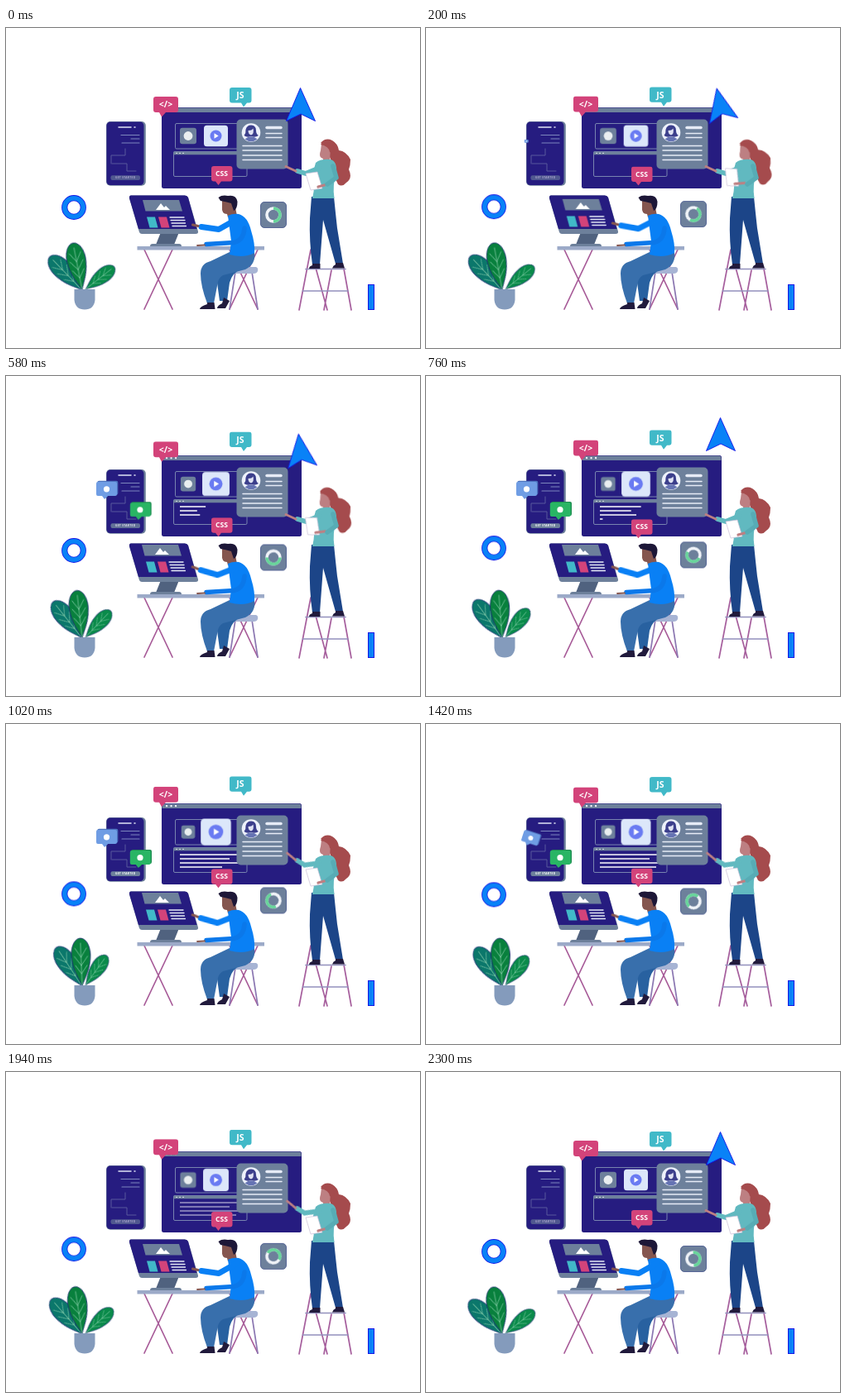
Recreate the animation shown at these times as an HTML page without scripts. Size 500x387 px, loop 2.32 s.

```html
<!DOCTYPE html>
<html lang="en">
<head>
<meta charset="utf-8">
<title>Design team at work</title>
<style>
html, body { margin: 0; width: 100%; height: 100%; overflow: hidden; background: #fff; }
svg { display: block; width: 100vw; height: 100vh; }
text { font-family: "Open Sans", "Noto Sans", sans-serif; font-weight: 700; fill: #fff; text-anchor: middle; }

.bob, .sway, .swell { animation: 1160ms cubic-bezier(.37,0,.63,1) infinite alternate; }
.bob { animation-name: bob; }
.sway { animation-name: sway; }
.swell { animation-name: swell; }
@keyframes bob { to { transform: translateY(var(--to)); } }
@keyframes sway { from { transform: rotate(var(--from)); } to { transform: rotate(var(--to)); } }
@keyframes swell { to { transform: scale(var(--to)); } }

.loop { animation: 2320ms ease-in-out infinite; }
.spin { animation-name: spin; animation-timing-function: linear; }
@keyframes spin { to { transform: rotate(360deg); } }

.arrow { animation-name: fly; }
@keyframes fly {
  0%, 100% { transform: none; opacity: 1; }
  16.4% { transform: translate(-1px, 0) rotate(-21deg); }
  28% { transform: translateY(-3px) rotate(-4deg); animation-timing-function: ease-in; }
  32.8% { transform: translateY(-22px); opacity: 1; animation-timing-function: linear; }
  39% { transform: translateY(-55px); opacity: .8; }
  40%, 86% { transform: translateY(-55px); opacity: 0; }
  87% { transform: none; opacity: 0; }
  95% { transform: none; opacity: 1; }
}

.nod { animation-name: nod; }
@keyframes nod { 0%, 32%, 100% { transform: none; } 16.4% { transform: var(--to); } }

.point { animation-name: point; transform-origin: 382px 168px; }
@keyframes point { 0%, 34%, 98%, 100% { transform: none; } 43%, 86% { transform: rotate(15deg); } }

.scroll { animation-name: scroll; }
.reach { animation-name: reach; transform-origin: 277px 232px; }
@keyframes scroll { 0%, 5%, 82%, 100% { transform: none; } 15%, 68% { transform: translate(-1px, -4px); } }
@keyframes reach { 0%, 5%, 82%, 100% { transform: none; } 15%, 68% { transform: rotate(8deg); } }

.pop { animation-name: pop; }
.pop.late { animation-name: pop-late; }
@keyframes pop {
  0%, 6% { transform: scale(0); }
  15%, 58% { transform: none; }
  61.2% { transform: translate(5px, 1px) rotate(18deg) scale(.82); }
  67%, 100% { transform: translate(14px, 3px) rotate(50deg) scale(0); }
}
@keyframes pop-late {
  0%, 13% { transform: scale(0); }
  16.4% { transform: scale(.25); }
  26%, 66% { transform: none; }
  74%, 100% { transform: scale(0); }
}

.glow { animation-name: glow; }
@keyframes glow { 0%, 18%, 82%, 100% { opacity: .6; } 30%, 64% { opacity: 1; } }

.code { animation-name: fade; }
@keyframes fade { 0%, 58% { opacity: 1; } 83.6% { opacity: .55; } 97%, 100% { opacity: 0; } }
.code path { stroke-dasharray: 1 1; animation: type 2320ms linear infinite; }
.code path:nth-child(n+2) { animation-name: type-next; }
.code path:nth-child(4) { animation-name: type-last; }
@keyframes type { 0%, 12% { stroke-dashoffset: 1; } 43%, 100% { stroke-dashoffset: 0; } }
@keyframes type-next { 0%, 15.5% { stroke-dashoffset: 1; } 43%, 100% { stroke-dashoffset: 0; } }
@keyframes type-last { 0%, 32% { stroke-dashoffset: 1; } 48%, 100% { stroke-dashoffset: 0; } }

.line { fill: none; stroke-linecap: round; stroke-linejoin: round; }
.navy { fill: #261c80; }
.slate { fill: #6d809b; }
.pale { stroke: #e6ebf6; }
.pink { fill: #d3437a; }
.teal { fill: #41b9c8; }
.skin { stroke: #bd7f82; }
.shirt { stroke: #0980f5; }
.top { stroke: #61b9c0; }
</style>
</head>
<body>
<svg viewBox="0 0 500 387">
<defs>
  <g id="leaf">
    <path d="M0 0C-3-9-11-19-11.500-38C-11.500-50-6-58 0-58C6-58 11.500-50 11.500-38C11-19 3-9 0 0Z" stroke="#1b2772" stroke-width=".8"/>
    <path class="line" d="M0 0V-52M0-15L-7-25M0-15L7-25M0-25L-8-36M0-25L8-36M0-35L-7-46M0-35L7-46" stroke="#8fd3b0" stroke-width=".7"/>
  </g>
  <path id="note" d="M2 0H23Q25 0 25 2V15Q25 17 23 17H14L10 21L7 17H2Q0 17 0 15V2Q0 0 2 0Z"/>
</defs>
<rect width="500" height="387" fill="#fff"/>

<!-- plant -->
<g transform="translate(92 317)" fill="#0b776b">
  <g class="sway" style="--from:-44deg;--to:-33deg"><use href="#leaf" transform="scale(.97)"/></g>
</g>
<g transform="translate(96 316)" fill="#0a8a4a">
  <g class="sway" style="--from:52deg;--to:35deg"><use href="#leaf" transform="scale(.76)"/></g>
</g>
<g transform="translate(92 317)" fill="#08803d">
  <g class="sway" style="--from:-11deg;--to:-2deg"><use href="#leaf"/></g>
</g>
<path d="M82.500 316H107.500V329Q106 340.500 95 340.500Q84 340.500 82.500 329Z" fill="#849bbc"/>

<!-- loose shapes -->
<g class="bob" style="--to:-12px" fill="none">
  <circle cx="82" cy="217" r="11.300" stroke="#1414e6" stroke-width="7.200"/>
  <circle cx="82" cy="217" r="11.300" stroke="#0982f7" stroke-width="5.600"/>
</g>
<rect x="437.500" y="310.500" width="7" height="30" fill="#0982f7" stroke="#1414e6"/>

<!-- phone -->
<rect x="121" y="113" width="47.800" height="77.800" rx="5" class="slate"/>
<rect x="121.500" y="113.500" width="45" height="76.500" rx="4.500" class="navy"/>
<g class="line">
  <path d="M136 120H151M155 120H156" stroke="#dfe4f5" stroke-width="1.500"/>
  <path d="M139 129.500H161M151 134H161M140 139H161" stroke="#7d86bd" stroke-width="1.200"/>
  <path d="M127 164V154H144V146M128 164H146V173H157" stroke="#59599c"/>
</g>
<g class="loop glow">
  <rect x="126.500" y="178.300" width="35.500" height="5.800" rx="2" class="slate"/>
  <text x="144.200" y="182.400" font-size="3.300" letter-spacing=".3">GET STARTED</text>
</g>
<g class="loop pop" style="transform-origin:121px 137px">
  <use href="#note" x="110.300" y="126.800" fill="#4d74bf"/>
  <use href="#note" x="109" y="128" fill="#6f9de4"/>
  <circle cx="121.500" cy="136.800" r="3.600" fill="#fff"/>
</g>
<g class="loop pop late" style="transform-origin:157px 170px">
  <use href="#note" x="151" y="152" fill="#1e8b50"/>
  <use href="#note" x="149.800" y="153" fill="#29b564"/>
  <circle cx="162" cy="161.700" r="3.600" fill="#fff"/>
</g>

<!-- wide screen -->
<rect x="188" y="96" width="169" height="98" rx="2.500" class="navy"/>
<path d="M188.500 102V99Q188.500 96.500 191 96.500H354Q356.500 96.500 356.500 99V102Z" class="slate"/>
<path class="line" d="M194 99.200h.1M199.500 99.200h.1M205 99.200h.1" stroke="#fff" stroke-width="2.200"/>
<g fill="none" stroke="#8290b5" stroke-width=".9">
  <rect x="204.500" y="115.500" width="77" height="30.500" rx="1.500"/>
  <rect x="202.500" y="149.500" width="88.500" height="30" rx="1.500"/>
</g>
<path d="M202.500 149.500H291V153.300H202.500Z" class="slate"/>
<path class="line" d="M206 151.400h.1M210 151.400h.1M214 151.400h.1" stroke="#fff" stroke-width="1.300"/>
<g class="loop code" fill="none" stroke="#fff" stroke-width="1.500">
  <path pathLength="1" d="M210 158H284"/>
  <path pathLength="1" d="M210 163H270"/>
  <path pathLength="1" d="M210 168H280"/>
  <path pathLength="1" d="M210 173H278"/>
</g>
<g class="swell" style="--to:.82;transform-origin:220px 130.500px">
  <rect x="210" y="120.800" width="20" height="19.500" rx="3" class="slate"/>
  <circle cx="220" cy="130.500" r="5.400" fill="#e9eef0"/>
</g>
<g class="swell" style="--to:1.27;transform-origin:253.500px 130.500px">
  <rect x="239" y="117.800" width="29" height="25.500" rx="3.500" fill="#dce7fa"/>
  <circle cx="253.500" cy="130.500" r="7" fill="#6a7bf2"/>
  <path d="M251.500 127.300L256.700 130.500L251.500 133.700Z" fill="#fff"/>
</g>

<!-- profile card -->
<rect x="278.500" y="110.500" width="62" height="60" rx="5" class="slate"/>
<circle cx="296" cy="126.500" r="11.300" fill="#edf1fb"/>
<path d="M287.500 130Q290 127 289.500 123Q291 117 296.500 117.500Q302 118 302 124Q302 128 305 130Q301 133 296 131Q291 133 287.500 130Z" fill="#3c3f8c"/>
<path d="M292.500 124Q297 124 298.500 121.500Q300 128 296 129.500Q292.500 128.500 292.500 124Z" fill="#dfe2f3"/>
<path d="M288.500 134.500Q296 128 303.500 134.500Q296 140 288.500 134.500Z" fill="#6573b3"/>
<g class="line pale">
  <path d="M315 120.500H332" stroke-width="3.500"/>
  <path d="M314 127.500H333M314 132.500H333M286 142.500H333M286 148H333M286 154H333M286 159.500H333" stroke-width="1.500"/>
</g>

<!-- speech bubbles -->
<g class="bob" style="--to:-7.500px">
  <path class="pink" d="M181 83H205Q208 83 208 86V99Q208 102 205 102H193L188 107.500L185 102H181Q178 102 178 99V86Q178 83 181 83Z"/>
  <text x="193" y="96.300" font-size="10.500">&lt;/&gt;</text>
</g>
<g class="bob" style="--to:-9px">
  <path class="teal" d="M273 72H293.500Q296.500 72 296.500 75V87.500Q296.500 90.500 293.500 90.500H291L287 95.500L284 90.500H273Q270 90.500 270 87.500V75Q270 72 273 72Z"/>
  <text x="282.800" y="85.200" font-size="10.500">JS</text>
</g>
<g class="bob" style="--to:8.500px">
  <path class="pink" d="M251 167H270.500Q273.500 167 273.500 170V182.500Q273.500 185.500 270.500 185.500H260L256.500 190L253 185.500H251Q248 185.500 248 182.500V170Q248 167 251 167Z"/>
  <text x="260.500" y="179.200" font-size="8.600">CSS</text>
</g>

<!-- chart tile -->
<g class="bob" style="--to:-13px">
  <rect x="307.500" y="210.500" width="31" height="31" rx="4.500" class="slate" stroke="#40518a" stroke-width=".8"/>
  <g class="loop spin" style="transform-origin:323px 226px" fill="none" stroke-width="3.600">
    <circle cx="323" cy="226" r="8" stroke="#f0f3f8"/>
    <path d="M323 218A8 8 0 0 1 323 234" stroke="#67d59a"/>
  </g>
</g>

<!-- desk and monitor -->
<path d="M187 247H209L203 262H181Z" fill="#50627f"/>
<path d="M177 261H209Q212 261 212 264H174Q174 261 177 261Z" class="slate"/>
<path d="M151 202.500H216Q219 202.500 220 205L232 246Q232.500 249 229 249H164Q162 249 161 247L149 206Q148.500 202.500 151 202.500Z" class="slate"/>
<path d="M151 202.500H216Q219 202.500 220 205L230.500 243H160L149 206Q148.500 202.500 151 202.500Z" class="navy"/>
<g class="loop scroll">
  <path d="M165 208H209L213 221.500H168.500Z" class="slate"/>
  <path d="M181 220L187 212L191 217L193 215L198 220Z" fill="#fff"/>
  <path d="M170 228.500H180L183.500 241.500H173.500Z" class="teal"/>
  <path d="M184 228.500H194L197.500 241.500H187.500Z" class="pink"/>
  <path class="line pale" d="M198 229H215M199 232.500H216M200 236H216.500M201 239.500H217.500" stroke-width="1.300"/>
</g>
<path class="line" d="M167 268L201 340M201 268L167 340M270 268L304 340M304 268L270 340" stroke="#a75b98" stroke-width="1.700"/>
<path class="line" d="M277 295L270 340M297 295L304 340" stroke="#8c78b2" stroke-width="1.700"/>
<path d="M268 289H302Q305 290 304 294Q303 297 299 297H272Q267 296 268 289Z" fill="#a7b4d4"/>
<path d="M158.500 264H312V268.500H158.500Z" fill="#9caac8"/>

<!-- seated man -->
<path d="M258 288L286 290Q273 296 270 308L267 330H258L255 308Z" fill="#2861a0"/>
<path d="M270 271Q288 278 300 271Q302 286 289 292L262 299Q256 302 255 312L251 333H243Q235 312 235 297Q235 285 247 282Z" fill="#386fac"/>
<path d="M243 332H251.500L252.500 340H234Q234 337 243 334Z" fill="#211a3c"/>
<path d="M263 326L270 330L265 339H255Q255 336 261 333Z" fill="#211a3c"/>
<path d="M261 209L275 207L279 227L268 229L267 225Q260 225 261 216Z" fill="#85564f"/>
<path d="M256.500 205Q261 201.500 268 203Q278 201 279.500 210Q279.500 219 275 221L272 212Q265 210 259 209Z" fill="#1d1737"/>
<path d="M268 227Q274 224 281 225Q292 228 296 245Q301 261 300 272Q287 279 270 274L272 258Z" fill="#0980f5"/>
<path class="line" d="M288 242Q287 257 275 259.500L242 261.500" stroke="#0b78ea" stroke-width="5.500"/>
<path class="line" d="M240 262.500L231 263" stroke="#85564f" stroke-width="1.800"/>
<g class="loop reach line">
  <path d="M279 231L257 243.500L236 240.500" class="shirt" stroke-width="7"/>
  <path d="M232 239.500L225.500 238" stroke="#85564f" stroke-width="3"/>
</g>

<!-- ladder -->
<g class="line" stroke="#a65f9d" stroke-width="1.700">
  <path d="M368 268L354 341M368 268L388 341M408 291L417 341M393 293L384 341"/>
  <path d="M362 291.500H410M358.500 318H413" stroke="#9290bd"/>
</g>

<!-- standing woman -->
<path d="M369 204H396Q398 224 400 242L407 285H398L383 232L379 286H370Q366 257 367 230Z" fill="#1c4588"/>
<path d="M370 285H379.500V291H366Q366 288 370 287ZM398 284H407L409 290.500H394Q395 287 398 286Z" fill="#211a3c"/>
<g class="loop nod" style="--to:translate(-1px, 1px) rotate(-8deg);transform-origin:386px 150px">
  <path d="M380 139Q386 132 394 136Q401 140 402 148Q411 149 416 159Q416 166 414 171Q419 182 411 187Q406 193 401 189Q396 180 397 167Q388 156 391 146Z" fill="#a54b4d"/>
  <path d="M381 140Q388 136 392 145L391 160L383 163L383 158Q377 157 380 148Z" fill="#bd7f82"/>
  <path d="M380 141Q387 132 394 137L397 153L391 150Q390 143 380 141Z" fill="#a54b4d"/>
</g>
<path d="M374 163Q380 158 392 159Q400 161 399 175Q394 190 396.500 206H370Q374 190 371 174Z" fill="#61b9c0"/>
<g class="loop point line">
  <path d="M379 169L362 176L352 173" class="top" stroke-width="6"/>
  <path d="M350 173L338 167.500" class="skin" stroke-width="2.800"/>
</g>
<g class="loop nod" style="--to:translate(-4px, 1px) rotate(20deg);transform-origin:398px 181px">
  <path d="M362 176L376 174L382 194L368 196Z" fill="#fff" stroke="#c9bed6" stroke-width=".7"/>
  <path class="line skin" d="M377 192L388 189" stroke-width="3.200"/>
</g>
<path class="line" d="M395 167L399 181L388 189" stroke="#57acb5" stroke-width="5.500"/>

<!-- cursor -->
<path class="loop arrow" style="transform-origin:356px 92px" d="M355.500 72.500L373.500 112.500L356 104L338.500 112.500Z" fill="#0982f7" stroke="#1414e6" stroke-width=".9"/>
</svg>
</body>
</html>
```
